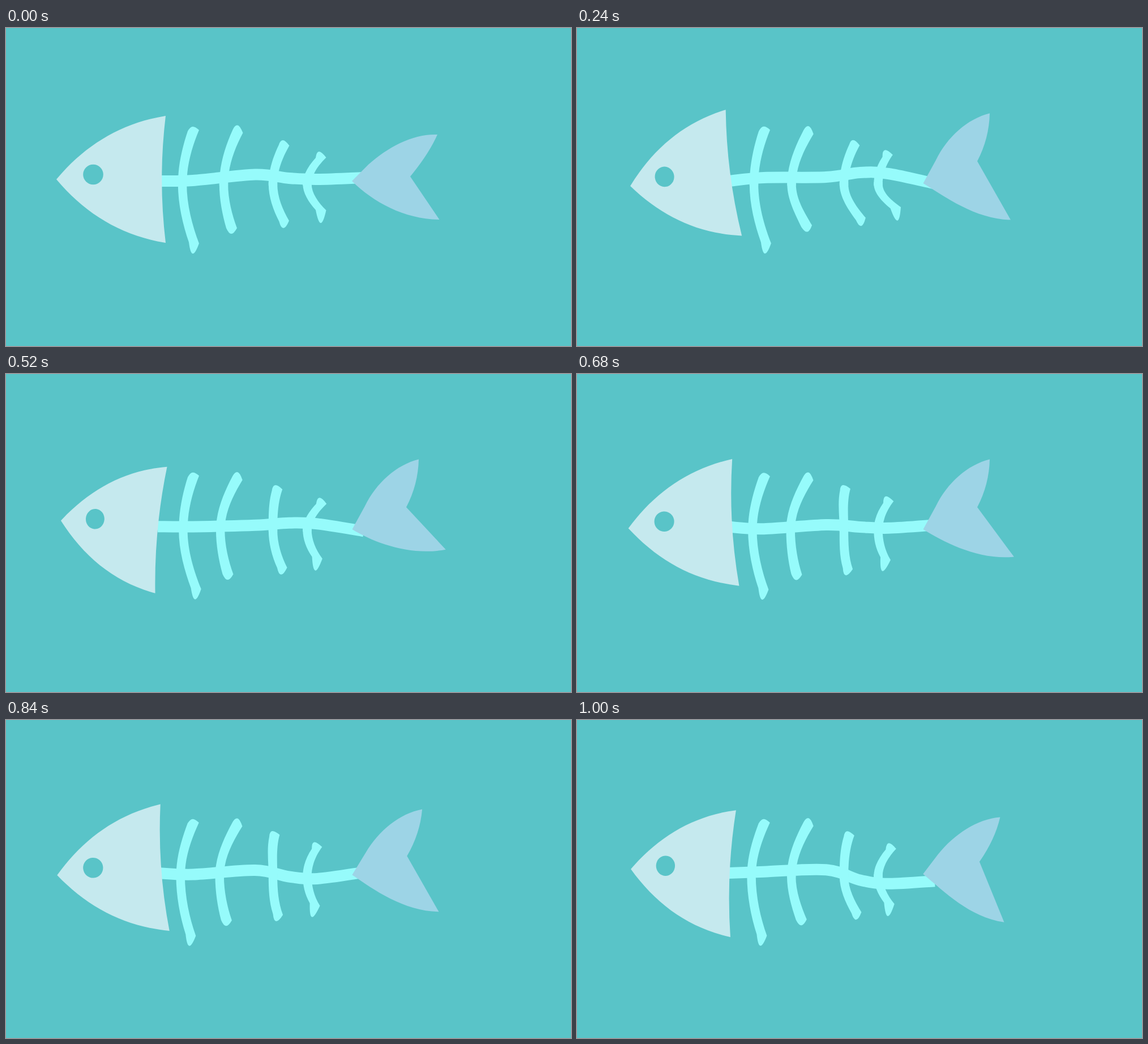
These frames come from a looping animation (998x561 px, 1.04 s). An HTML page:

```html
<!DOCTYPE html>
<html lang="en">
<head>
<meta charset="utf-8">
<title>Fish skeleton</title>
<style>
  html, body { margin: 0; width: 100%; height: 100%; overflow: hidden; background: #59c4c8; }
  svg { display: block; width: 100%; height: 100%; }
</style>
</head>
<body>
<svg viewBox="0 0 998 561">
  <rect width="998" height="561" fill="#59c4c8"/>
  <path id="spine" fill="none" stroke="#96fbfb" stroke-width="20"/>
  <g id="ribs" fill="#96fbfb"></g>
  <path id="tail" fill="#9dd4e6"/>
  <g id="head">
    <path fill="#c5e9ee" d="M-96.500 0C-46-60 17-99 96.500-112Q83 0 96.500 112C17 99-46 60-96.500 0Z"/>
    <circle cx="-31.500" cy="-8.500" r="17.800" fill="#59c4c8"/>
  </g>
</svg>
<script>
const LOOP = 1040, STEP = 40;
const POSES = [0, 240, 480, 760, LOOP];
const $ = id => document.getElementById(id);
const mix = (a, b, u) => a + (b - a) * u;

// Every part moves at a steady pace from one key pose to the next.
function pose(t, values) {
  const i = POSES.findIndex((start, k) => t < POSES[k + 1]);
  return mix(values[i], values[i + 1], (t - POSES[i]) / (POSES[i + 1] - POSES[i]));
}

// The head nods around its centre and narrows as it turns.
function drawHead(t) {
  const nod = pose(t, [0, 7.3, -7.5, 7.4, -4.2]);
  const width = pose(t, [1, .955, .906, 1.015, .925]);
  $('head').setAttribute('transform', `translate(185.5 267) rotate(${-nod}) scale(${width} 1)`);
}

// Knots of the spine: x, then the height in each key pose.
const spine = [
  [268, [270, 270, 269, 270, 270]],
  [330, [269, 264, 268.5, 275, 266.5]],
  [440, [258.5, 263, 267, 265.5, 264]],
  [500, [265, 255, 261, 273.5, 284]],
  [550, [267, 257, 262.5, 275.5, 291]],
  [632, [264, 274.5, 280, 261, 288]]
];
function drawSpine(t) {
  const knots = spine.map(([x, heights]) => [x, pose(t, heights)]);
  let d = `M${knots[0]}`;
  for (let i = 0; i < knots.length - 1; i++) {
    const a = knots[i], b = knots[i + 1], before = knots[i - 1] || a, after = knots[i + 2] || b;
    const c1 = a.map((v, k) => v + (b[k] - before[k]) / 6);
    const c2 = b.map((v, k) => v - (after[k] - a[k]) / 6);
    d += `C${c1} ${c2} ${b}`;
  }
  $('spine').setAttribute('d', d);
}

// Each rib has two limbs that lean, in degrees, around its joint with the spine.
// A limb is its tip and two corners, measured outward from the joint.
const still = [0, 0, 0, 0, 0];
const ribs = [
  { x: 311.5, shift: [0, 1, 2.2, -3.2, -3.5], pinned: true,
    up: { tip: [18.5, 101], outer: [29.5, 95], inner: [9.5, 93], lean: still },
    down: { tip: [18.5, 123], outer: [29.5, 105], inner: [11.5, 103], lean: [0, .5, 1.7, -1.4, -1.1] } },
  { x: 384.5, shift: [0, -5.5, -5.5, -8, -5.5], pinned: true,
    up: { tip: [24, 103.5], outer: [34, 90], inner: [16, 95.5], lean: still },
    down: { tip: [13.5, 88], outer: [23.5, 78], inner: [4.5, 78], lean: [0, 9.5, 0, -3.3, 3.7] } },
  { x: 471.5, shift: still,
    up: { tip: [17.5, 77], outer: [29, 67.5], inner: [10.5, 69], lean: [0, -1, -9, -16.5, -7.5] },
    down: { tip: [18.5, 78], outer: [28.5, 65], inner: [11, 66.5], lean: [0, 9, -1, -15, 5] } },
  { x: 532, shift: still,
    up: { tip: [21, 57], outer: [33.5, 46.5], inner: [15, 46], lean: [0, -9, 3, -11.5, -.5] },
    down: { tip: [24, 69], outer: [33.5, 46.5], inner: [15, 46], lean: [0, 8.5, -6.5, -16, -4] } }
];
const JOINT_Y = 275, HALF = 7.7;
for (const rib of ribs) {
  for (const limb of [rib.up, rib.down]) {
    limb.path = document.createElementNS('http://www.w3.org/2000/svg', 'path');
    $('ribs').append(limb.path);
  }
}
function limbPath({ tip, outer, inner }, lean) {
  const cos = Math.cos(lean), sin = Math.sin(lean);
  const swing = (x, y) => [x * cos + y * sin, y * cos - x * sin];
  // Sides leave the joint upright and bend towards the swung corner.
  const atJoint = ([, y], half) => [half, y * .35];
  const atCorner = ([x, y], half) => swing(mix(x, half, .55), y * .7);
  const [x, y] = tip;
  return `M${-HALF} -3V0C${atJoint(inner, -HALF)} ${atCorner(inner, -HALF)} ${swing(...inner)}` +
    `Q${swing(x - 4.5, y)} ${swing(x, y)}Q${swing(x + 4.5, y)} ${swing(...outer)}` +
    `C${atCorner(outer, HALF)} ${atJoint(outer, HALF)} ${HALF} 0V-3Z`;
}
function drawRib({ x, shift, pinned, up, down }, t) {
  const dx = pose(t, shift);
  for (const limb of [up, down]) {
    const hold = pinned && limb === up ? -dx / limb.tip[1] : 0;
    const lean = pose(t, limb.lean) * Math.PI / 180 + hold;
    limb.path.setAttribute('d', limbPath(limb, lean));
    limb.path.setAttribute('transform', `translate(${x + dx} ${JOINT_Y}) scale(1 ${limb === up ? -1 : 1})`);
  }
}

// The upper fluke folds between two shapes; the lower tip moves on its own.
function drawTail(t) {
  const fold = pose(t, [0, 1, 1, 1, .35]);
  const bx = pose(t, [765.5, 766, 778, 769.5, 752]);
  const by = pose(t, [338, 338.5, 306.5, 329, 361.5]);
  const p = (x0, y0, x1, y1) => [mix(x0, x1, fold), mix(y0, y1, fold)];
  const root = p(611, 270, 611.5, 274);
  $('tail').setAttribute('d',
    `M${root}L${p(640, 241, 634, 233)}` +
    `C${p(676, 209, 654, 192)} ${p(720, 186, 690, 160)} ${p(762, 188, 729, 150.5)}` +
    `Q${p(747, 222, 728, 195)} ${p(714, 262, 707, 235)}L${bx} ${by}` +
    `C${bx - 62} ${by + (338 - by) * .45 - 1} ${root[0] + 39} ${root[1] + 38 - 14 * fold} ${root}Z`);
}

function frame() {
  const t = Math.floor(performance.now() % LOOP / STEP) * STEP;
  drawSpine(t);
  ribs.forEach(rib => drawRib(rib, t));
  drawTail(t);
  drawHead(t);
  requestAnimationFrame(frame);
}
frame();
</script>
</body>
</html>
```
